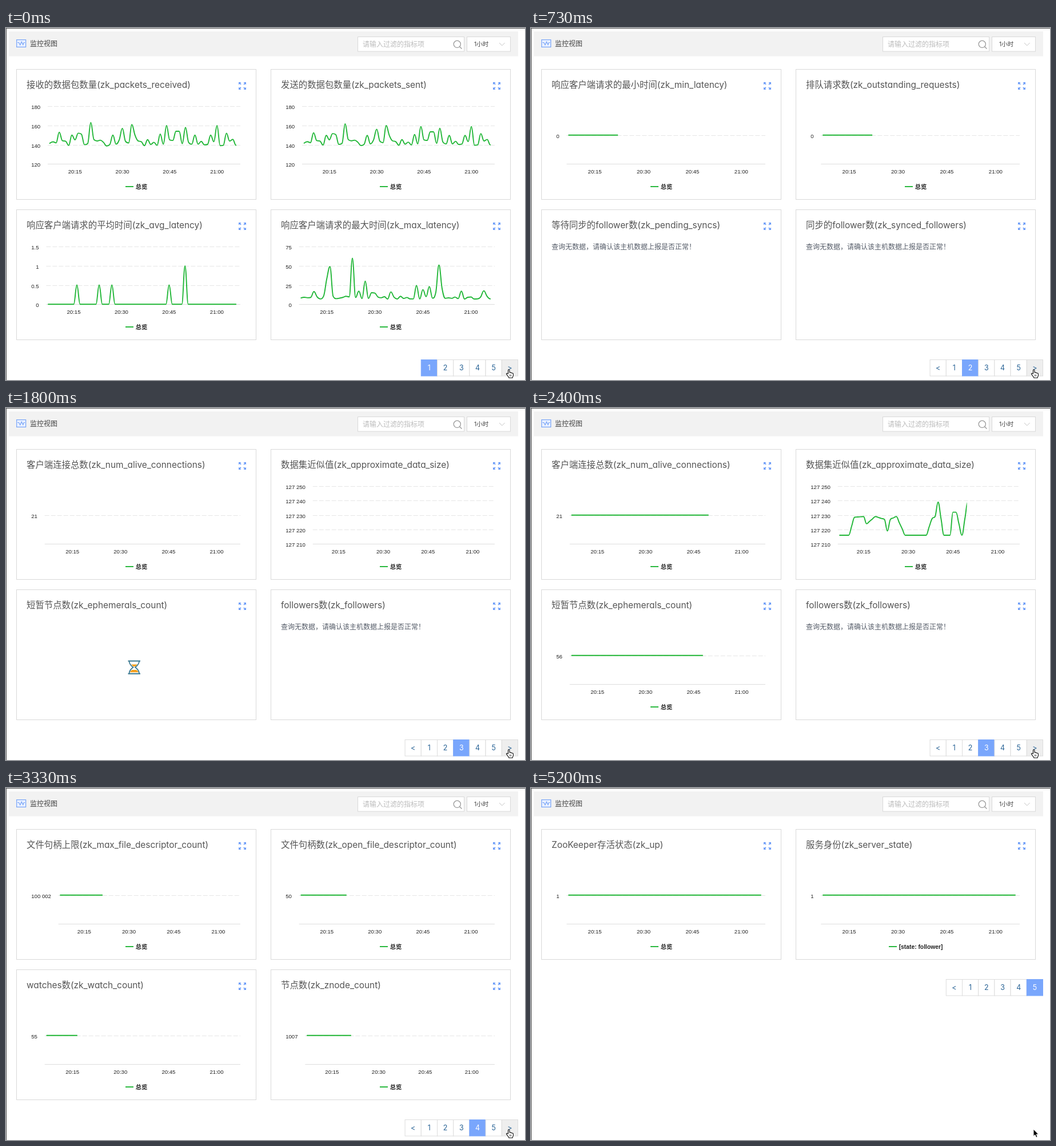
These frames come from a looping animation (908 by 617 pixels, 5.8 s). An HTML page:

```html
<!DOCTYPE html>
<html lang="zh-CN">
<head>
<meta charset="utf-8">
<title>监控视图</title>
<style>
html, body { margin: 0; width: 100%; height: 100%; overflow: hidden; background: #fff; }
svg { display: block; width: 908px; height: 617px; }
text { font-family: Inter, "Noto Sans CJK SC", "Noto Sans CJK JP", "Noto Sans CJK", sans-serif; font-size: 12px; fill: #444; }
.title { font-size: 15.4px; fill: #555; font-feature-settings: "cv11"; }
.axis { font: 9.6px "Liberation Sans", Arial, sans-serif; fill: #222; }
.legend { font: bold 10.3px "Liberation Sans", "Noto Sans CJK SC", sans-serif; fill: #222; }
.page { font-size: 12.5px; fill: #2a6496; text-anchor: middle; }
.empty { fill: #555c68; }
.hint { fill: #bbb; }
.range { font-size: 10.5px; }
.line { fill: none; stroke: #20b636; stroke-width: 1.9; stroke-linejoin: round; }
.curve { stroke-linecap: round; }
.grid { stroke: #e6e6e6; stroke-dasharray: 8 3; }
.base { stroke: #dedede; }
.box { fill: #fff; stroke: #d9d9d9; }
</style>
</head>
<body>
<svg id="stage" viewBox="0 0 908 617" xmlns="http://www.w3.org/2000/svg"></svg>
<script>
const LOOP = 5800, STEP = 200 / 3;
const TOP = 137.2, BOTTOM = 238.2, RIGHT = 410, POINTS = 60;

const minutes = fn => Array.from({ length: POINTS }, (_, i) => fn(i));

// Seeded noise from -1 to 1.
const noise = i => {
  const v = Math.sin(i * 12.9898 + 4) * 43758.5453;
  return 2 * (v - Math.floor(v)) - 1;
};

// A noisy base level with a few named peaks.
const peaky = (base, jitter, peaks) => minutes(i => peaks[i] ?? base + jitter * noise(i));

// Straight runs between key points.
const through = keys => minutes(i => {
  const k = Math.max(1, keys.findIndex(([at]) => at >= i));
  const [a, from] = keys[k - 1], [b, to] = keys[k];
  return from + (to - from) * (i - a) / (b - a);
});

const received = peaky(142, 3.5, {
  3: 153, 7: 150, 9: 152, 10: 151, 13: 163, 20: 150, 23: 157, 26: 161, 27: 150,
  35: 151, 37: 160, 40: 154, 41: 154, 43: 158, 46: 150, 51: 150, 53: 160, 56: 152 });
const sent = received.map(v => 145 + .93 * (v - 145));
const avgLatency = peaky(0, 0, { 9: .5, 16: .5, 20: .5, 38: .5, 43: 1 });
const maxLatency = peaky(8.5, 2, {
  4: 16.5, 8: 33, 9: 49, 16: 60, 18: 17, 20: 30, 22: 15, 23: 14.5, 28: 16,
  36: 24.5, 38: 19, 40: 23, 42: 15, 43: 51, 44: 20, 50: 17, 57: 17.5 });
const dataSize = through([
  [0, 216], [3, 216], [5, 228.5], [8, 229], [9, 224], [12, 229], [15, 227], [16, 219],
  [17, 227], [19, 229], [22, 216], [29, 216], [31, 227.5], [32, 229], [33, 239], [35, 216],
  [37, 216], [38, 232], [39, 232], [41, 216], [43, 239], [46, 216], [59, 216]]);

function chart(title, data, min, max, step, prefix = '') {
  const ticks = [];
  for (let v = max; v >= min; v -= step) ticks.push(prefix + v);
  return { title, data, min, max, ticks };
}
const level = (title, label, extra) =>
  ({ title, data: minutes(() => 0), min: -1, max: 1, ticks: [label], ...extra });
const empty = title => ({ title });

const pages = [
  { at: 0, cards: [
    chart('接收的数据包数量(zk_packets_received)', received, 120, 180, 20),
    chart('发送的数据包数量(zk_packets_sent)', sent, 120, 180, 20),
    chart('响应客户端请求的平均时间(zk_avg_latency)', avgLatency, 0, 1.5, .5),
    chart('响应客户端请求的最大时间(zk_max_latency)', maxLatency, 0, 75, 25)] },
  { at: 266, draw: 360, span: 1100, cards: [
    level('响应客户端请求的最小时间(zk_min_latency)', '0'),
    level('排队请求数(zk_outstanding_requests)', '0'),
    empty('等待同步的follower数(zk_pending_syncs)'),
    empty('同步的follower数(zk_synced_followers)')] },
  { at: 1666, draw: 1794, span: 950, cards: [
    level('客户端连接总数(zk_num_alive_connections)', '21'),
    chart('数据集近似值(zk_approximate_data_size)', dataSize, 210, 250, 10, '127 '),
    level('短暂节点数(zk_ephemerals_count)', '56', { lag: 19 }),
    empty('followers数(zk_followers)')] },
  { at: 2933, draw: 2989, span: 1050, cards: [
    level('文件句柄上限(zk_max_file_descriptor_count)', '100 002'),
    level('文件句柄数(zk_open_file_descriptor_count)', '50'),
    level('watches数(zk_watch_count)', '55', { lag: 63 }),
    level('节点数(zk_znode_count)', '1007')] },
  { at: 4066, draw: 4100, span: 1150, fullGlass: true, cards: [
    level('ZooKeeper存活状态(zk_up)', '1'),
    level('服务身份(zk_server_state)', '1', { legend: '[state: follower]' })] }
];

const text = (x, y, cls, str, attrs = '') => `<text x="${x}" y="${y}" class="${cls}" ${attrs}>${str}</text>`;
const hline = (x1, x2, y, cls) => `<path class="${cls}" d="M${x1} ${y}H${x2}"/>`;
const rect = (x, y, w, h, attrs) => `<rect x="${x}" y="${y}" width="${w}" height="${h}" ${attrs}/>`;
const between = (v, a, b) => Math.min(Math.max(v, Math.min(a, b)), Math.max(a, b));

// The plot starts right of its widest tick label.
const labelWidth = label => [...String(label)].reduce((w, ch) => w + (/\d/.test(ch) ? 5.34 : 2.67), 0);
const plotLeft = ticks => 57 + Math.max(...ticks.map(labelWidth));

// Smooth curve whose control points never overshoot their neighbours.
function spline(pts) {
  let d = `M${pts[0]}`, out = pts[0];
  for (let i = 1; i < pts.length; i++) {
    const [x, y] = pts[i], [px, py] = pts[i - 1], [nx, ny] = pts[i + 1] || pts[i];
    const slope = (ny - py) / (nx - px), reach = (x - px) * .4;
    let ly = between(y - slope * reach, py, y);
    const ry = between(2 * y - ly, y, ny);
    ly = 2 * y - ry;
    d += `C${out} ${x - reach} ${ly} ${x} ${y}`;
    out = [x + reach, ry];
  }
  return d;
}

function plot({ data, min, max, ticks, legend = '总览' }, id) {
  const left = plotLeft(ticks), width = RIGHT - left, gaps = ticks.length - 1;
  const xAt = minute => left + width * (minute + 8.65) / 61.05;
  const yAt = share => TOP + (BOTTOM - TOP) * share;
  let s = hline(left, RIGHT, 238.5, 'base');
  ticks.forEach((label, i) => {
    const y = Math.round(yAt(gaps ? i / gaps : .5));
    if (!gaps || i < gaps) s += hline(left, RIGHT, y + .5, 'grid');
    s += text(left - 12.8, y + 4.8, 'axis', label, 'text-anchor="end"');
  });
  ['20:15', '20:30', '20:45', '21:00'].forEach((label, i) =>
    s += text(xAt(15 * i), 254.8, 'axis', label, 'text-anchor="middle"'));
  const legendX = legend.length > 2 ? 181 : 209;
  s += hline(legendX, legendX + 14, 278, 'line') + text(legendX + 17.7, 281.5, 'legend', legend);
  const points = data.map((v, i) => [xAt(i - 8), yAt((max - v) / (max - min))]);
  return s + `<clipPath id="clip${id}">${rect(left, 130, width, 112, `id="wipe${id}"`)}</clipPath>
    <path class="line curve" clip-path="url(#clip${id})" d="${spline(points)}"/>`;
}

function hourglass(full) {
  const sand = full
    ? 'M217.5 200h14q-1 4-5 6.5h-4q-4-2.5-5-6.5z'
    : 'M219 203.5h11l-3.5 3.5h-4zM217 217.3q.5-3 4-4.3h6.5q3.5 1.3 4 4.3z';
  return `<path fill="#f5a01e" d="${sand}"/><g fill="none" stroke="#3a7890" stroke-width="2">
    <path d="M213.5 197.5h21.5M213.5 219.8h21.5"/>
    <path stroke-width="1.7" d="M215.5 198q.5 6 7 10.5q-6.5 4.5-7 10.5M233 198q-.5 6-7 10.5q6.5 4.5 7 10.5"/></g>`;
}

function expandIcon() {
  const arrow = 'M-6.5-6.5h4.5l-1.5 1.5 1.7 1.7-1.3 1.3-1.7-1.7-1.7 1.7z';
  return `<g transform="translate(413.5 101.5)" fill="#6d9df8">${
    [0, 90, 180, 270].map(a => `<path transform="rotate(${a})" d="${arrow}"/>`).join('')}</g>`;
}

function card(c, p, i) {
  const id = `${p}-${i}`;
  const body = c.data ? plot(c, id) : text(36, 387.7 - 246, 'empty', '查询无数据，请确认该主机数据上报是否正常！');
  return `<g transform="translate(${445 * (i % 2)} ${246 * (i >> 1)})">
    ${rect(18.5, 72.5, 419, 228, 'class="box"')}${text(36, 105, 'title', c.title)}${expandIcon()}
    <g id="wait${id}">${hourglass(pages[p].fullGlass)}</g><g id="body${id}">${body}</g></g>`;
}

function pager(p) {
  const last = p === pages.length - 1, w = 28.2, y = last ? 335.5 : 581.5;
  const labels = [...(p ? ['&lt;'] : []), 1, 2, 3, 4, 5, ...(last ? [] : ['&gt;'])];
  const x0 = 895.5 - w * labels.length;
  return labels.map((label, i) => {
    const x = x0 + w * i, active = label === p + 1;
    const fill = active ? '#79a6fc' : label === '&gt;' ? '#eee' : '#fff';
    return rect(x, y, w, 28.5, `fill="${fill}" stroke="${active ? fill : '#ddd'}"`) +
      text(x + w / 2, y + 18.3, 'page', label, active ? 'style="fill:#fff"' : '');
  }).join('');
}

const hand = `<path fill="#fff" stroke="#111" stroke-width="1.1" stroke-linejoin="round"
  d="M878.5 606v-5.7q0-1.5 1.2-1.5t1.2 1.5v3.5q1.8-.7 2.2.6 1.6-.6 2.1.6 2.2-.3 2.2 1.6v2.5q0 1.5-1.2 2.7v1.5h-6.5v-1.3q-1.3-.8-2.3-2.8l-1.9-2.6q-.2-1.7 1.5-1.2z"/>
  <path stroke="#111" stroke-width=".8" d="M881.5 607.5v3M883.5 607.5v3"/>`;
const arrowCursor = '<path stroke="#fff" d="M879 598v12.5l2.8-2.6 2 4.6 2.3-1-2-4.400h3.700z"/>';

const header = rect(5, 6, 891, 43.5, 'fill="#f2f2f2"') +
  '<path d="M0 .5H908M.5 0V617" stroke="#555"/>' +
  `<g fill="none" stroke="#79a5f7" stroke-width="1.2">${rect(18.6, 20.6, 16, 12.8, 'fill="#eaf1ff"')}
   <path d="M20 25.5h2.5l2.2 4.2 2.5-5.5 2.6 5 1.5-3.7h2"/></g>` +
  text(42, 31.8, 'head', '监控视图') +
  rect(615.5, 15.5, 186, 25.5, 'class="box"') + text(624, 32.8, 'hint', '请输入过滤的指标项') +
  '<g fill="none" stroke="#999" stroke-width="1.3"><circle cx="789.3" cy="28.3" r="6.1"/><path d="M793.7 32.700l3.800 3.800"/></g>' +
  rect(806.5, 15.5, 76, 25.5, 'class="box"') + text(819, 32, 'range', '1小时') +
  '<path d="M863 26l4.800 4.800 4.800-4.800" fill="none" stroke="#c4c4c4"/>';

const $ = id => document.getElementById(id);
$('stage').innerHTML = header + pages.map((page, p) =>
  `<g id="page${p}">${page.cards.map((c, i) => card(c, p, i)).join('')}${pager(p)}${
    p === pages.length - 1 ? arrowCursor : hand}</g>`).join('');

const show = (el, on) => el.setAttribute('display', on ? 'inline' : 'none');
const swing = u => .5 - Math.cos(Math.PI * between(u, 0, 1)) / 2;

// The screen refreshes 15 times a second, on times rounded to 10 ms.
function snap(t) {
  let k = Math.floor((t + 4) / STEP);
  if (t < Math.round(k * STEP / 10) * 10) k--;
  return k * STEP;
}

function render(ms) {
  const t = snap(ms % LOOP);
  const current = pages.findLastIndex(page => t >= page.at);
  pages.forEach((_, p) => show($(`page${p}`), p === current));
  const { draw, span, cards } = pages[current];
  cards.forEach(({ data, ticks, lag = 0 }, i) => {
    const id = `${current}-${i}`;
    const u = draw ? (t - draw - lag) / span : 1;
    show($(`wait${id}`), u < 0);
    show($(`body${id}`), u >= 0);
    if (data) $(`wipe${id}`).setAttribute('width', (RIGHT - plotLeft(ticks)) * swing(u));
  });
}

const begin = performance.now();
function tick() {
  render(performance.now() - begin);
  requestAnimationFrame(tick);
}
tick();
</script>
</body>
</html>
```
